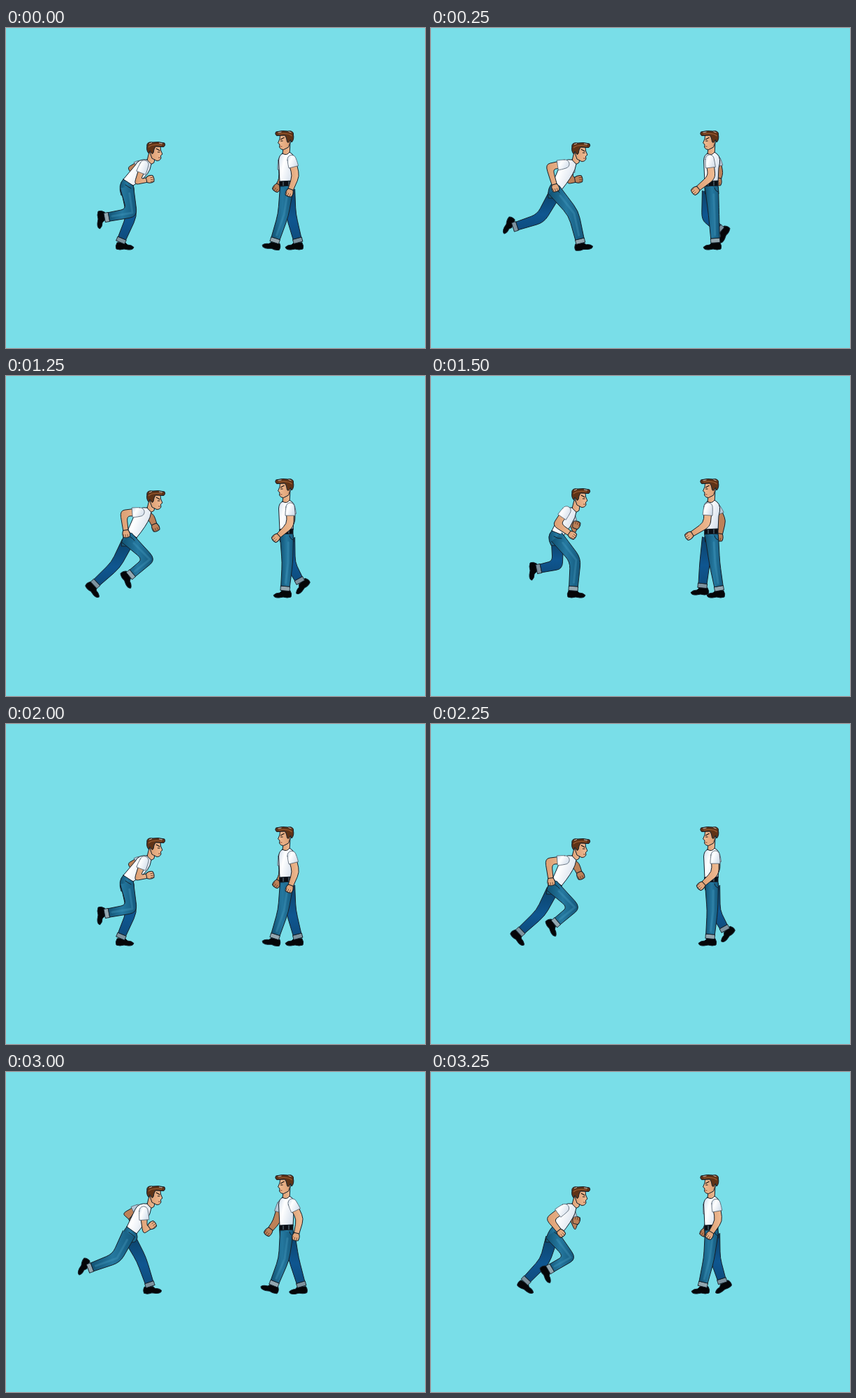
Write an HTML page that moves like this. It is 600x459 px and loops after 3500 ms.

```html
<!DOCTYPE html>
<html lang="en">
<head>
<meta charset="utf-8">
<title>Run and walk cycle</title>
<style>
html, body { margin: 0; width: 100%; height: 100%; overflow: hidden; background: #79dee8; }
svg { display: block; width: 100%; height: 100%; }
.pose { display: none; }
.pose.on { display: inline; }
.ink { stroke: #14202a; stroke-width: 1; stroke-linejoin: round; stroke-linecap: round; }
.line { fill: none; }
</style>
</head>
<body>
<svg id="stage" viewBox="0 0 600 459">
  <defs>
    <linearGradient id="denim">
      <stop offset="0" stop-color="#115273"/><stop offset=".5" stop-color="#25789f"/><stop offset="1" stop-color="#14587c"/>
    </linearGradient>
    <linearGradient id="denimFar" x2="0" y2="1">
      <stop offset="0" stop-color="#0c4268"/><stop offset=".6" stop-color="#0f5690"/><stop offset="1" stop-color="#0e4c7e"/>
    </linearGradient>
    <linearGradient id="skin">
      <stop offset="0" stop-color="#dc9e72"/><stop offset="1" stop-color="#f0bc94"/>
    </linearGradient>
    <linearGradient id="shirt" x1="0" y1="0" x2="1" y2=".5">
      <stop offset="0" stop-color="#cdd9e8"/><stop offset=".4" stop-color="#fff"/><stop offset="1" stop-color="#d6e0ec"/>
    </linearGradient>
    <g id="head">
      <path class="ink" fill="url(#skin)" d="M208 169L221 169L221.500 175L224 181L221.500 183L222 187Q220 191 216 190.500L209 187L206 178Z"/>
      <path class="ink" fill="#5f3317" d="M202 169C201 165 205 163 210 164L218 163.500L227 165Q229 168 226 170.500L214 170L212 174L211 179Q209.500 182 208 179L206 176L204.500 180Q200.500 176 202 169Z"/>
      <path class="line" stroke="#9a5a30" stroke-width="1.300" d="M204 171Q209 166 223 168"/>
      <path class="line" stroke="#e9e4dc" stroke-width=".8" d="M205 166L209 164.500M219 165L224 166"/>
      <path class="line" stroke="#1a1210" stroke-width="1.200" d="M215 173L220.500 176M217 178L220.500 178"/>
      <path class="line" stroke="#8a4a35" d="M218 186L221 186"/>
    </g>
  </defs>
</svg>
<script>
const stage = document.getElementById('stage');
const mix = (a, b, t) => [a[0] + (b[0] - a[0]) * t, a[1] + (b[1] - a[1]) * t];
const at = p => p.map(v => v.toFixed(1)).join(' ');
const add = (p, x, y) => [p[0] + x, p[1] + y];
const unit = (a, b) => {
  const x = b[0] - a[0], y = b[1] - a[1], d = Math.hypot(x, y) || 1;
  return [x / d, y / d];
};
const path = (d, fill, extra = '') => `<path class="ink" d="${d}" fill="${fill}" ${extra}/>`;

// Tapered two-bone outline, open at its root unless a cap radius is given
function limb(root, joint, end, w, cap) {
  const u = unit(root, joint), v = unit(joint, end);
  const n = [-u[1], u[0]], m = [-v[1], v[0]];
  const sum = [n[0] + m[0], n[1] + m[1]], len = Math.hypot(...sum) || 1;
  const miter = 1 / Math.max(.78, len / 2);
  const side = s => {
    const a = add(root, n[0] * w[0] * s, n[1] * w[0] * s);
    const k = add(joint, sum[0] / len * w[1] * miter * s, sum[1] / len * w[1] * miter * s);
    const b = add(end, m[0] * w[2] * s, m[1] * w[2] * s);
    return { a, k, b, in: mix(a, k, .75), out: mix(k, b, .28) };
  };
  const l = side(1), r = side(-1);
  return `M${at(l.a)}L${at(l.in)}Q${at(l.k)} ${at(l.out)}L${at(l.b)}` +
         `L${at(r.b)}L${at(r.out)}Q${at(r.k)} ${at(r.in)}L${at(r.a)}` +
         (cap ? `A${cap} ${cap} 0 0 0 ${at(l.a)}Z` : '');
}

function leg(hip, [kx, ky, ax, ay, tilt], dir, near) {
  const knee = [kx, ky], ankle = [ax, ay], v = unit(knee, ankle);
  const end = add(ankle, v[0] * 6, v[1] * 6);
  const shoe = path('M-7 6Q-10 11 -8 15Q-3 17 3 15L9 16Q16 16.500 17 12.500Q14 9 8 9L5 6Z', '#050608',
    `transform="translate(${ax} ${ay}) scale(${dir} 1) rotate(${tilt})"`);
  const shine = near ? `<path class="line" stroke="#4fa6c8" stroke-width="3" opacity=".28" stroke-linecap="round" stroke-linejoin="round"
    d="M${at(add(mix(hip, knee, .25), 2, 0))}L${at(add(knee, 1, 0))}L${at(mix(knee, ankle, .85))}"/>` : '';
  return shoe +
    path(limb(hip, knee, ankle, near ? [9.6, 7.6, 6.3] : [8.6, 7.2, 6]), near ? 'url(#denim)' : 'url(#denimFar)') +
    shine +
    path(limb(ankle, mix(ankle, end, .5), end, [6.6, 6.6, 6.6]) + 'Z', near ? '#93a7b0' : '#7d929e');
}

function arm(shoulder, [ex, ey, hx, hy], near) {
  const elbow = [ex, ey], hand = [hx, hy], skin = near ? 'url(#skin)' : '#bd8158';
  const hem = mix(shoulder, elbow, .47), a = Math.atan2(hy - ey, hx - ex) * 180 / Math.PI;
  return path(limb(shoulder, elbow, hand, [5.6, 5, 3.5]), skin) +
    `<g transform="translate(${hx} ${hy}) rotate(${a})">` +
    path('M-5 -3.500Q0 -6.500 5 -4.500Q7 0 5 4.500Q0 6.500 -5 3.500Z', skin) +
    '<path class="line" stroke="#5d3522" stroke-width=".8" d="M1 -2L6 -2M1 1L6 1M0 4L5 3.500"/></g>' +
    path(limb(shoulder, mix(shoulder, hem, .5), hem, [6.2, 6.8, 7], 6.2), near ? 'url(#shirt)' : '#b9c7d6',
      'style="stroke:#4d5b69;stroke-width:.8"');
}

function runner(p) {
  const [hip, back, front] = [p.hip, p.back || [174, 222], p.front || [187, 232]];
  return arm(p.farShoulder || [199, 197], p.farArm) +
    leg(add(hip, 1, 6), p.farLeg, 1) +
    path('M205 178L202 190L207 196L212 193L213 186Z', 'url(#skin)') +
    `<use href="#head" y="${p.headY || 0}"/>` +
    path(`M202 189Q190 187 185 197L${at(back)}Q${at(add(mix(back, front, .5), -1, 3))} ${at(front)}Q201 215 206 203L208 195Q205 193 202 189Z`, 'url(#shirt)') +
    path(`M${at(back)}L${at(front)}Q${at(add(front, 3, 8))} ${at(add(hip, 8, 12))}L${at(add(hip, -8, 12))}Q${at(add(back, -8, 8))} ${at(back)}Z`, 'url(#denim)') +
    leg(hip, p.leg, 1, true) +
    path(`M${at(add(back, 3, 8))}Q${at(add(back, 9, 12))} ${at(add(front, -3, 4))}`, 'none') +
    arm(p.shoulder, p.arm, true);
}

function walker(p) {
  return arm(p.farShoulder || [396, 190], p.farArm) +
    leg(p.farHip || [405, 232], p.farLeg, -1) +
    path('M397 170L396 181Q400 186 406 181L407 164Z', 'url(#skin)') +
    '<use href="#head" transform="translate(613.5 -16) scale(-1 1)"/>' +
    path('M396 180Q391 182 390.500 190L392 221L411 221L412 201Q416 186 410 181L406 178Q402 184 396 180Z', 'url(#shirt)') +
    path('M392 226L411 226L412 238L393 238Z', 'url(#denim)') +
    leg([402, 229], p.leg, -1, true) +
    path('M392 220L411 219L411 226L392 227Z', '#0b0e14') +
    '<path class="line" stroke="#66808e" d="M397 220.500V226M405 220V226"/>' +
    path('M406 229Q407 234 411 235', 'none') +
    arm(p.shoulder, p.arm, true);
}

const RUN = {
  A: { hip: [173, 228], back: [168, 217], front: [182, 226], shoulder: [198, 196], farShoulder: [192, 196],
       leg: [180, 265, 147, 271, 90], farLeg: [180, 269, 166, 302, 0], arm: [188, 221, 206, 217], farArm: [180, 202, 186, 212] },
  B: { hip: [176, 232], headY: 1, shoulder: [192, 195],
       leg: [204, 266, 213, 303, -8], farLeg: [157, 273, 123, 284, 112], arm: [169, 199, 178, 229], farArm: [199, 219, 211, 217] },
  C: { hip: [175, 232], shoulder: [198, 198], farShoulder: [190, 196],
       leg: [157, 271, 130, 296, 45], farLeg: [205, 264, 181, 283, 60], arm: [197, 226, 211, 219], farArm: [171, 202, 181, 213] },
  D: { hip: [176, 232], back: [173, 222], shoulder: [197, 199], farShoulder: [190, 196],
       leg: [158, 267, 123, 280, 112], farLeg: [194, 269, 205, 302, -3], arm: [199, 227, 209, 220], farArm: [173, 204, 182, 212] },
  E: { hip: [172, 232], headY: 1, shoulder: [192, 195],
       leg: [199, 266, 173, 281, 60], farLeg: [163, 271, 138, 297, 30], arm: [170, 211, 186, 231], farArm: [206, 222, 208, 213] },
  F: { hip: [173, 232], headY: 1, shoulder: [192, 195],
       leg: [205, 263, 181, 283, 60], farLeg: [157, 271, 130, 296, 45], arm: [168, 197, 172, 226], farArm: [208, 203, 214, 217] },
  G: { hip: [180, 231], headY: -2, back: [173, 222], front: [190, 229], shoulder: [194, 193],
       leg: [207, 264, 204, 302, 0], farLeg: [181, 271, 157, 276, 90], arm: [180, 213, 202, 228], farArm: [205, 222, 208, 214] },
  H: { hip: [174, 231], shoulder: [198, 197], farShoulder: [191, 196],
       leg: [163, 271, 141, 297, 30], farLeg: [200, 266, 173, 281, 60], arm: [191, 223, 208, 218], farArm: [177, 203, 184, 213] }
};

const WALK = {
  A: { shoulder: [409, 188], leg: [397, 268, 386, 302, -10], farLeg: [408, 268, 417, 302, 0], arm: [415, 212, 406, 236], farArm: [396, 218, 388, 229] },
  B: { shoulder: [399, 188], farShoulder: [409, 190], farHip: [397, 234],
       leg: [405, 268, 407, 302, 0], farLeg: [395, 272, 411, 287, 60], arm: [402, 214, 379, 233], farArm: [413, 208, 411, 220] },
  C: { shoulder: [408, 188], farHip: [400, 232],
       leg: [399, 270, 414, 287, 60], farLeg: [402, 268, 404, 302, 0], arm: [413, 213, 404, 236], farArm: [392, 216, 383, 230] },
  D: { shoulder: [410, 188], farShoulder: [395, 189],
       leg: [398, 268, 385, 301, -18], farLeg: [412, 268, 422, 302, 3], arm: [421, 211, 415, 236], farArm: [387, 215, 376, 229] },
  E: { shoulder: [408, 188], leg: [398, 268, 390, 302, 0], farLeg: [407, 268, 416, 297, 30], arm: [412, 213, 399, 234], farArm: [398, 218, 391, 230] },
  F: { shoulder: [407, 188], farShoulder: [408, 190],
       leg: [403, 268, 400, 302, 0], farLeg: [407, 269, 419, 291, 45], arm: [407, 214, 387, 232], farArm: [409, 207, 406, 218] },
  G: { shoulder: [397, 188], farShoulder: [409, 190], farHip: [397, 232],
       leg: [406, 268, 412, 302, 0], farLeg: [392, 268, 389, 298, 0], arm: [395, 213, 370, 229], farArm: [417, 208, 413, 231] },
  H: { shoulder: [398, 188], farShoulder: [409, 190], farHip: [398, 232],
       leg: [406, 268, 413, 297, 30], farLeg: [393, 268, 386, 302, 0], arm: [399, 214, 377, 231], farArm: [416, 208, 412, 228] }
};

const ORDER = 'ABCDEFGHAFGHDE', STEP = 250;
const poses = {};
for (const key in RUN) {
  const g = document.createElementNS('http://www.w3.org/2000/svg', 'g');
  g.setAttribute('class', 'pose');
  g.innerHTML = runner(RUN[key]) + walker(WALK[key]);
  poses[key] = stage.appendChild(g);
}

const start = performance.now();
let shown;
function draw() {
  const t = Math.max(0, performance.now() - start);
  const next = poses[ORDER[Math.floor(t / STEP) % ORDER.length]];
  if (next !== shown) {
    if (shown) shown.classList.remove('on');
    next.classList.add('on');
    shown = next;
  }
  requestAnimationFrame(draw);
}
draw();
</script>
</body>
</html>
```
